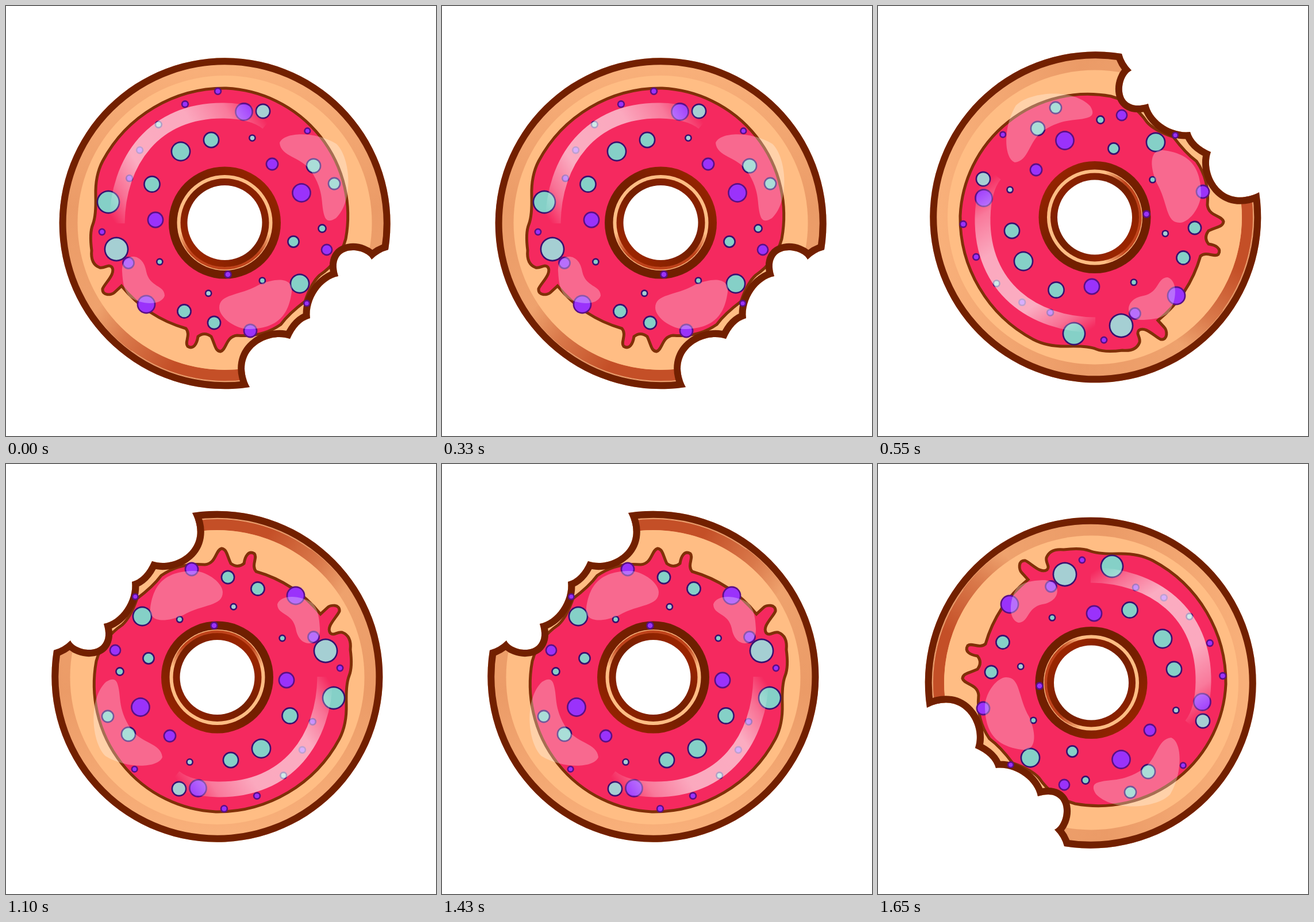
Recreate the animation shown at these times as an HTML page with a canvas. Size 748 px wide and 748 px high, loop 2200 ms.

```html
<!DOCTYPE html>
<html lang="en">
<head>
<meta charset="utf-8">
<title>Turning donut</title>
<style>
  html, body { margin: 0; width: 100%; height: 100%; overflow: hidden; background: #fff; }
  canvas { display: block; }
</style>
</head>
<body>
<canvas id="stage" width="748" height="748"></canvas>
<script>
const ctx = document.getElementById('stage').getContext('2d');
const SIZE = 748, STEP = 550, CX = 380.5, CY = 377;
const BROWN = '#722000', DOUGH = '#ffbd84';
const TEAL = ['#85d0c7', '#38106f'], PALE = ['#a5cfd3', '#38106f'], PURPLE = ['#9a32fb', '#5a0f86'];

// Outer circle with three bites taken out.
const body = new Path2D(`M665 424 Q649 428 636 441 C626 419 560 412 578 470
  C550 475 525 510 529 543 Q507 549 494 579 C455 565 392 600 424 663
  A288 288 0 1 1 665 424 Z`);

// Nearly a circle: arcs joined by a wavy left side and the drips.
const icing = new Path2D(`M402 573 Q445 577 478 554 Q492 535 520 514
  Q532 480 546 468 Q580 445 591 405 A222 222 0 0 0 383 143 A240 240 0 0 0 168 270
  Q155 295 156 330 T151 380 T149 425 C147 445 155 452 163 455
  C172 457 178 448 184 454 C192 465 172 482 168 492 C167 505 184 503 189 498
  L201 487 A225 225 0 0 0 313 561 C322 572 310 585 316 592
  C326 598 332 588 334 575 Q345 566 357 575 C364 590 364 600 373 601 C384 598 382 575 402 573 Z`);

const gloss = new Path2D(`M476 238 C484 218 540 218 575 240 C600 265 605 340 574 369
  Q560 378 555 368 C546 345 556 325 530 286 C512 262 478 262 476 238 Z
  M371 525 C371 500 405 505 440 485 C475 470 500 475 497 497 C492 535 475 562 420 562
  C395 560 371 540 371 525 Z
  M202 462 C200 430 238 425 244 462 C250 490 276 485 276 504 C270 522 235 520 215 506
  C205 495 203 480 202 462 Z`);

const shine = new Path2D('M193 378 C194 270 258 180 380 182 Q430 183 455 203');

function gradient(x0, y0, x1, y1, ...stops) {
  const g = ctx.createLinearGradient(x0, y0, x1, y1);
  stops.forEach(([at, color]) => g.addColorStop(at, color));
  return g;
}

function disc(x, y, r, fill) {
  ctx.beginPath();
  ctx.arc(x, y, r, 0, 2 * Math.PI);
  ctx.fillStyle = fill;
  ctx.fill();
}

function stroke(path, width, color) {
  ctx.lineWidth = width;
  ctx.strokeStyle = color;
  ctx.stroke(path);
}

function arc(r, from, to, width, color) {
  const path = new Path2D();
  path.arc(CX, CY, r, from, to);
  stroke(path, width, color);
}

function sprinkle([fill, edge], x, y, r) {
  disc(x, y, r + .4, edge);
  disc(x, y, r - 2.2, fill);
}

function sprinkles(color, ...places) {
  places.forEach(place => sprinkle(color, ...place));
}

// Small sprinkles along a spiral around the hole; angles in degrees.
function trail(colors, count, angle, turn, dist, drift, r) {
  for (let k = 0; k < count; k++) {
    const a = (angle + k * turn) * Math.PI / 180, d = dist + k * drift;
    sprinkle(colors[k % colors.length], CX + d * Math.cos(a), CY + d * Math.sin(a), r);
  }
}

function drawDough() {
  ctx.fillStyle = gradient(0, 95, 0, 560, [0, '#f9b17b'], [.55, '#eb9b67'], [1, '#efa36e']);
  ctx.fillRect(0, 0, SIZE, SIZE);
  arc(266, 1.3, 2.55, 20, gradient(150, 540, 290, 630,
    [0, '#c44f2700'], [.4, '#c44f2780'], [1, '#c44f27']));
  disc(CX, CY, 256, DOUGH);
  arc(275.5, 1.3, 2.2, 1.2, '#e79a6c');
}

function drawHole() {
  disc(CX, CY, 97.5, gradient(320, 440, 445, 310, [0, '#6f1f00'], [.6, '#761f00'], [1, '#932300']));
  disc(CX, CY, 83, DOUGH);
  arc(79, .25, 2.9, 5.5, gradient(0, 395, 0, 430, [0, '#bf431b00'], [1, '#bf431b']));
  disc(CX, CY, 77, gradient(330, 430, 435, 325, [0, '#9a2500'], [.5, '#741f00'], [1, '#8a2100']));
  disc(CX, CY, 65, '#fff');
}

function drawSprinkles() {
  sprinkles(TEAL, [178, 341, 20], [304, 253, 17], [357, 233, 14], [254, 310, 14.5],
    [535, 278, 13], [571, 309, 11], [500, 410, 10.5], [550, 387, 7.5],
    [511, 483, 17], [310, 531, 12.5], [362, 551, 12]);
  sprinkles(PALE, [192, 423, 21], [447, 183, 13]);
  sprinkles(PURPLE, [414, 184, 15.5], [463, 275, 11], [514, 325, 16.5], [260, 372, 14],
    [213, 447, 10.5], [244, 519, 16], [425, 565, 12], [558, 424, 10], [167, 393, 6], [386, 467, 6.5]);
  trail([PURPLE, PURPLE, TEAL], 5, 205, 15.5, 183, 11.5, 6.3);
  trail([PURPLE], 2, -48, 92.5, 215, -15, 5.7);
  trail([TEAL, PALE], 3, 57, 46, 120, 6, 6);
  trail([PALE], 1, 288, 0, 155, 0, 6);
}

function drawDonut() {
  ctx.save();
  ctx.clip(body);
  drawDough();
  ctx.fillStyle = '#f5295f';
  ctx.fill(icing);
  stroke(icing, 5, '#803008');
  stroke(body, 24, BROWN);
  ctx.restore();

  drawHole();
  drawSprinkles();

  ctx.fillStyle = '#ffffff4c';
  ctx.fill(gloss);
  stroke(shine, 27, gradient(190, 378, 456, 205, [0, '#fff0'], [.12, '#ffffff55'],
    [.28, '#ffffff9c'], [.65, '#ffffff98'], [.85, '#ffffff60'], [1, '#fff0']));
}

function frame() {
  const turn = Math.floor(performance.now() / STEP) % 4;
  ctx.setTransform(1, 0, 0, 1, 0, 0);
  ctx.fillStyle = '#fff';
  ctx.fillRect(0, 0, SIZE, SIZE);
  ctx.translate(SIZE / 2, SIZE / 2);
  ctx.rotate(-turn * Math.PI / 2);
  ctx.translate(-SIZE / 2, -SIZE / 2);
  drawDonut();
  requestAnimationFrame(frame);
}
frame();
</script>
</body>
</html>
```
